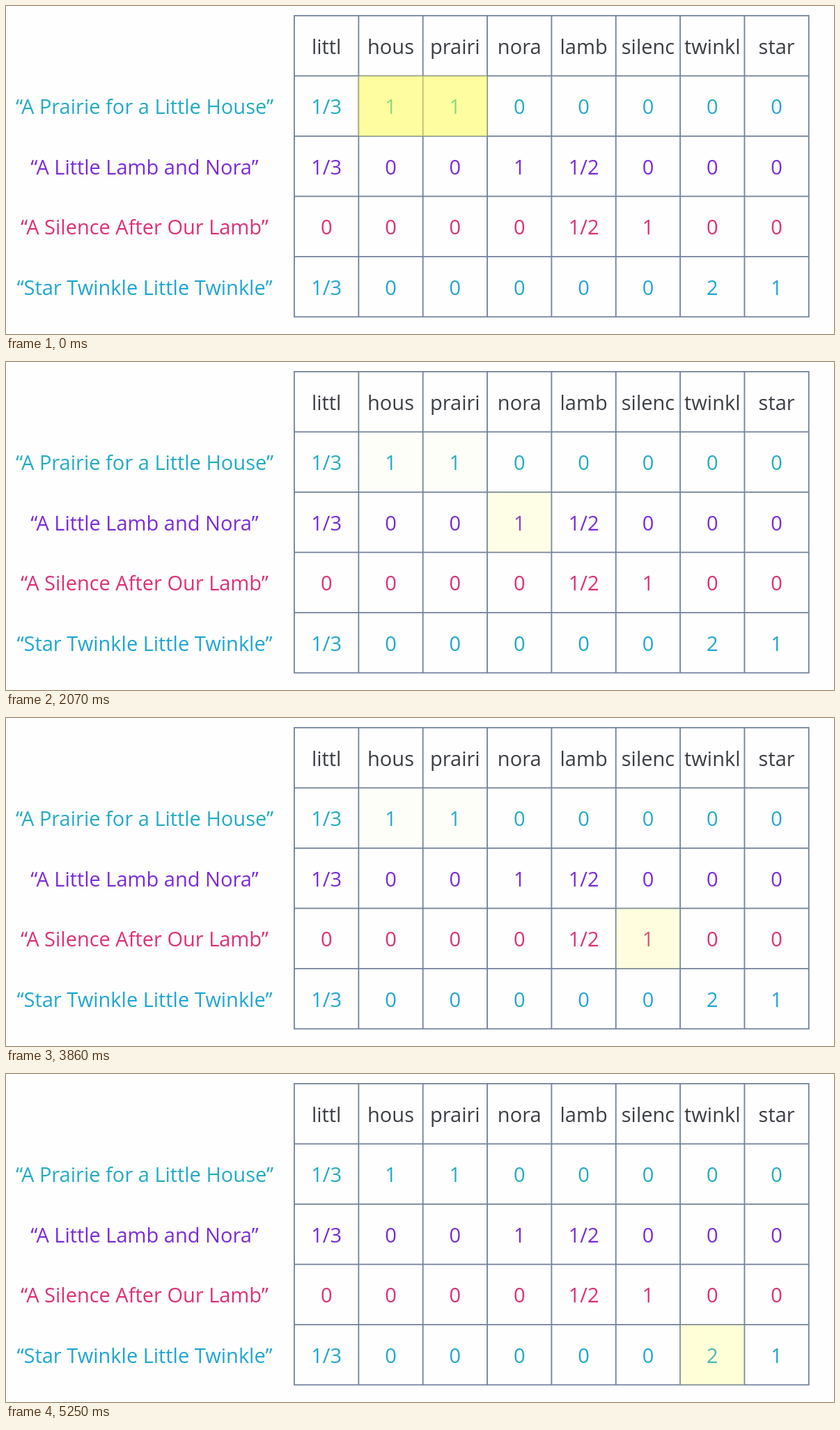
Recreate the animation shown at these times as an HTML page. Size 1189 by 471 pixels, loop 5610 ms.

```html
<!DOCTYPE html>
<html lang="en">
<head>
<meta charset="utf-8">
<title>Term weights</title>
<style>
  html, body { margin: 0; width: 100%; height: 100%; overflow: hidden; background: #fefefe; }
  svg { display: block; width: 100%; height: 100%; }
  text { font: 29px "Open Sans", "Noto Sans", sans-serif; text-anchor: middle; }
  path { fill: none; stroke: #71829c; stroke-width: 1.8; stroke-linecap: square; }
  rect { fill: #ffff42; opacity: 0; }
</style>
</head>
<body>
<svg viewBox="0 0 1189 471"></svg>
<script>
const LOOP = 5610;
const LEFT = 414, TOP = 13.8, CELL_W = 92.35, CELL_H = 86.5;
const COLS = 8, ROWS = 5;
const TITLE_X = 199, BASELINE = 54.8;

const terms = ["littl", "hous", "prairi", "nora", "lamb", "silenc", "twinkl", "star"];
const rows = [
  { title: "A Prairie for a Little House", color: "#23abc3", cells: "1/3 1 1 0 0 0 0 0" },
  { title: "A Little Lamb and Nora", color: "#7a2bdb", cells: "1/3 0 0 1 1/2 0 0 0" },
  { title: "A Silence After Our Lamb", color: "#df2f77", cells: "0 0 0 0 1/2 1 0 0" },
  { title: "Star Twinkle Little Twinkle", color: "#1fa6d3", cells: "1/3 0 0 0 0 0 2 1" },
];

// Each step is [start in ms, opacity], held until the next step.
const highlights = [
  { row: 1, col: 1, span: 2, steps: [[0, .5], [330, .15], [650, .02], [4560, 0]] },
  { row: 2, col: 3, span: 1, steps: [[0, 0], [1000, .5], [2070, .12], [2420, .01], [2770, 0]] },
  { row: 3, col: 5, span: 1, steps: [[0, 0], [2770, .5], [3860, .16], [4210, 0]] },
  { row: 4, col: 6, span: 1, steps: [[0, 0], [4560, .42], [4910, .5], [5250, .2]] },
];

const svg = document.querySelector("svg");
const colX = col => LEFT + col * CELL_W;
const rowY = row => TOP + row * CELL_H;

function add(tag, attrs, content = "") {
  const el = document.createElementNS(svg.namespaceURI, tag);
  for (const name in attrs) el.setAttribute(name, attrs[name]);
  el.textContent = content;
  return svg.appendChild(el);
}

function label(content, x, row, fill) {
  add("text", { x, y: rowY(row) + BASELINE, fill }, content);
}

function drawCells(values, row, fill) {
  values.forEach((value, col) => label(value, colX(col + .5), row, fill));
}

function drawGrid() {
  let d = "";
  for (let col = 0; col <= COLS; col++) d += `M${colX(col)} ${TOP}V${rowY(ROWS)}`;
  for (let row = 0; row <= ROWS; row++) d += `M${LEFT} ${rowY(row)}H${colX(COLS)}`;
  add("path", { d });
}

function drawHighlight({ row, col, span, steps }) {
  const box = add("rect", { x: colX(col), y: rowY(row), width: span * CELL_W, height: CELL_H });
  const frames = steps.map(([time, opacity]) => ({ offset: time / LOOP, opacity, easing: "step-end" }));
  frames.push({ offset: 1, opacity: steps.at(-1)[1] });
  box.animate(frames, { duration: LOOP, iterations: Infinity });
}

drawGrid();
drawCells(terms, 0, "#3b3e45");
rows.forEach(({ title, color, cells }, i) => {
  label(`“${title}”`, TITLE_X, i + 1, color);
  drawCells(cells.split(" "), i + 1, color);
});
highlights.forEach(drawHighlight);
</script>
</body>
</html>
```
